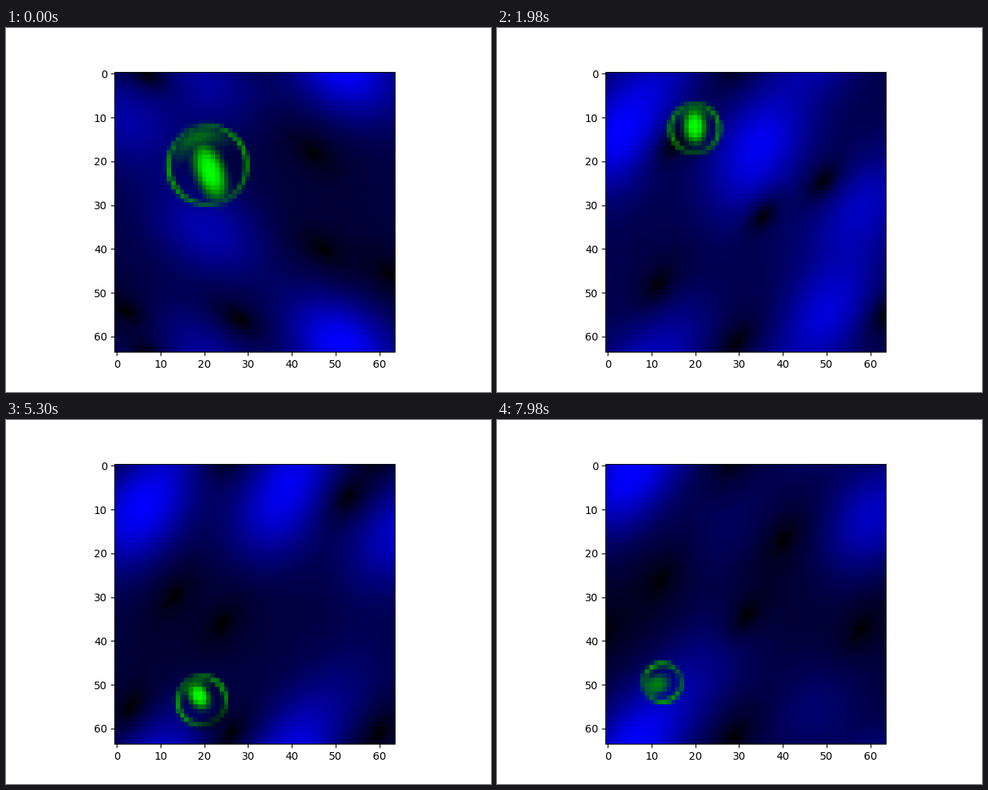
Write a matplotlib script that moves like this. It is 640 by 480 pixels and loops after 8 s.

```python
import numpy as np
import matplotlib.pyplot as plt
from matplotlib.animation import FuncAnimation

N = 64
STEP = 20
LOOP = 8000
Y, X = np.mgrid[0:N, 0:N].astype(float)

# Paths are key points evenly spaced over the loop.
# Fast regions of the flow: x, y, strength
crests = np.array([
    [(51, 62, .9), (50, 52, .45), (42, 62, .45), (47, 55, .35)],
    [(21, 36, .5), (39, 8, .65), (37, 10, .7), (27, 14, .3)],
    [(2, 10, .45), (4, 16, .75), (5, 11, .8), (3, 5, .8)],
    [(13, 62, .25), (14, 62, .4), (13, 63, .35), (11, 58, .6)],
    [(60, 20, 0), (56, 34, .65), (64, 14, .65), (60, 12, .8)],
    [(22, 2, .35), (40, 38, .3), (55, 50, .15), (24, 44, .45)],
])
# Still points of the flow: x, y
stills = np.array([
    [(28, 56), (30, 63), (26, 61), (29, 62)],
    [(47, 40), (50, 19), (53, 7), (40, 17)],
    [(7, 0), (18, 22), (13, 30), (12, 26)],
    [(2, 54), (15, 46), (3, 55), (-1, 38)],
    [(45, 18), (32, 38), (24, 36), (32, 34)],
    [(63, 46), (64, 58), (60, 61), (58, 37)],
])
track = np.array([(20.8, 21), (20.3, 16.8), (19.5, 7.8), (20.4, -2),
                  (19.4, -10.7), (15.5, -16.6), (12.5, -14.4)])


def follow(points, t):
    """Place on a path (points on the second-last axis) at t seconds."""
    last = points.shape[-2] - 1
    s = t * 1000 / LOOP * last
    i = min(int(s), last - 1)
    return points[..., i, :] + (s - i) * (points[..., i + 1, :] - points[..., i, :])


def ease(t, start, length):
    s = np.clip((t - start) / length, 0, 1)
    return s * s * (3 - 2 * s)


def wrap(d):
    return (d + N / 2) % N - N / 2


def rotated(dx, dy, degrees):
    a = np.radians(degrees)
    return dx * np.cos(a) + dy * np.sin(a), dy * np.cos(a) - dx * np.sin(a)


def distance2(x, y, length, width, tilt):
    u, v = rotated(X - x[:, None, None], wrap(Y - y[:, None, None]), tilt)
    return (u / length) ** 2 + (v / width) ** 2


def flow(t):
    """Speed: high near the crests, falling to zero at the still points."""
    tilt = 90 * np.exp(-t / .6) - 55
    x, y, level = follow(crests, t).T
    light = .3 + (level[:, None, None]
                  * np.exp(-distance2(x, y, 14, 10, tilt))).sum(axis=0)
    x, y = follow(stills, t).T
    q = distance2(x, y, 8, 4.5, tilt)
    speed = light * np.sqrt(q / (1 + q)).prod(axis=0)
    return speed / speed.max()


def glider(t):
    """Green level of the creature and how much of the flow shows through."""
    cx, cy = follow(track, t)
    heading = -90 - 20 * np.exp(-t) - 110 * ease(t, 4.5, 2.3)
    young = np.exp(-t / 1.6)
    radius = 5.5 + 3.4 * np.exp(-t / .4) - 1.2 * ease(t, 5.3, 2.7)
    ahead = 1.4 - 2.8 * young
    fade = 1 - .5 * ease(t, 7, 1)
    tail = np.sin(np.pi * t * 1000 / LOOP) ** 4

    dx, dy = X - cx, wrap(Y - cy)
    q = np.hypot(dx, dy) / radius
    turn = np.arctan2(dy, dx) - np.radians(heading)
    front = np.maximum(np.cos(turn), 0) ** 2
    back = np.maximum(-np.cos(turn), 0) ** 2
    rear = tail * back * np.exp(-((q - 1.05) / .22) ** 2)

    ring = np.exp(-((q - 1) * radius / .65) ** 2)
    green = ring * (.3 + .3 * np.sin(turn) ** 2) * (1 - .85 * rear)
    head = .42 * front * np.exp(-((q - .78) / .25) ** 2)
    u, v = rotated(dx, dy, heading)
    core = fade * np.exp(-np.hypot((u - ahead) / (2.8 + 3.5 * young),
                                   v / (2.1 + young)) ** 3)
    green = np.maximum.reduce([green, head, core])
    green[green < .04] = 0
    clear = (1 - .15 * (q < 1)) * (1 - rear) * (1 - np.minimum(1, 1.8 * green))
    return green, clear


def picture(t):
    green, clear = glider(t)
    rgb = np.zeros((N, N, 3))
    rgb[..., 1] = green
    rgb[..., 2] = flow(t) * clear
    return np.clip(rgb, 0, 1)


# The picture moves on in bursts of short steps with a pause between them.
bursts = [(20, 820, 17), (840, 1560, 17)]
bursts += [(a, a + 740, 18) for a in range(1660, 7000, 840)]
bursts += [(7540, 7980, 11)]
ticks = np.concatenate(
    [[0]] + [np.round(np.linspace(a, b, n) / STEP) * STEP for a, b, n in bursts])

fig, ax = plt.subplots(figsize=(6.4, 4.8), dpi=100)
image = ax.imshow(picture(0), interpolation="nearest")


def draw(i):
    now = ticks[np.searchsorted(ticks, i * STEP, "right") - 1]
    image.set_data(picture(now / 1000))
    return (image,)


def reset():
    return draw(0)


anim = FuncAnimation(fig, draw, frames=LOOP // STEP, init_func=reset,
                     interval=STEP, repeat=True, repeat_delay=0, blit=True)
plt.show()
```
